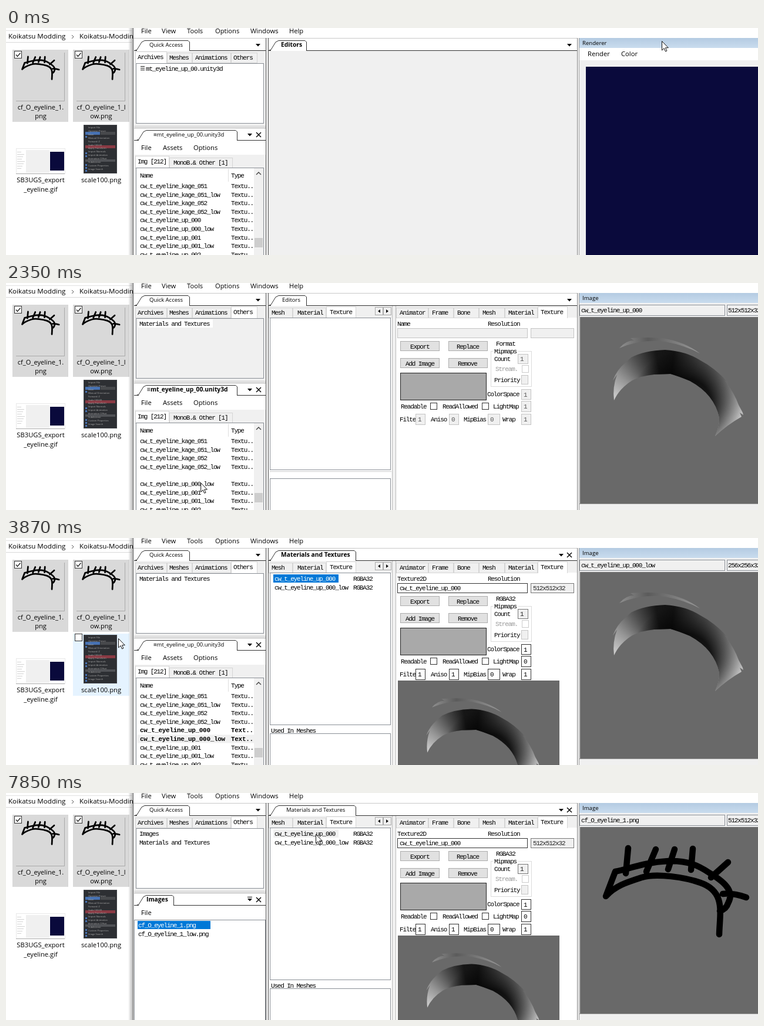
An HTML page with a canvas for the animation above (8000 ms loop, 1280 by 387 pixels).

```html
<!DOCTYPE html>
<html lang="en">
<head>
<meta charset="utf-8">
<title>Texture editor</title>
<style>
html, body { margin: 0; width: 100%; height: 100%; overflow: hidden; background: #fff; }
canvas { display: block; width: 1280px; height: 387px; }
</style>
</head>
<body>
<canvas id="stage" width="1280" height="387"></canvas>
<script>
const ctx = document.getElementById('stage').getContext('2d');
const LOOP = 8000, STEP = 70;
const FACE = '#f0f0f0', EDGE = '#8a8f96', BLUE = '#0078d7', GREY = '#696969';
const SANS = '"Open Sans", "Noto Sans", sans-serif';
const MONO = '"Liberation Mono", "DejaVu Sans Mono", monospace';

// bursts of change: start, end
const BURSTS = [[0, 840], [930, 1700], [1790, 2000], [2280, 3050], [3140, 3350], [3590, 4390],
  [4460, 4630], [4880, 5630], [5720, 6490], [6560, 7120], [7290, 7850]];
// pointer path: time, x, y
const PATH = [[0, 1116, 22], [280, 800, 190], [560, 390, 352], [700, 332, 358], [840, 325, 325],
  [1280, 325, 325], [1560, 331, 339], [2280, 331, 340], [2700, 332, 342], [3590, 333, 343],
  [3870, 191, 171], [4250, 156, 104], [4390, 153, 93], [4460, 153, 93], [4630, 155, 96],
  [4880, 155, 96], [5090, 166, 118], [5280, 235, 190], [5490, 330, 305], [5720, 330, 305],
  [6080, 346, 260], [6350, 340, 230], [6560, 340, 230], [6770, 322, 222], [7290, 322, 222],
  [7570, 425, 140], [7850, 527, 70]];

function snap(t) {
  const [a, b] = BURSTS.filter(s => s[0] <= t).pop();
  return Math.min(b, a + Math.floor((t - a) / STEP) * STEP);
}

function pointer(t) {
  const i = PATH.findIndex(p => p[0] > t);
  if (i < 0) return PATH[PATH.length - 1].slice(1);
  const [t0, x0, y0] = PATH[i - 1], [t1, x1, y1] = PATH[i];
  const k = (t - t0) / (t1 - t0);
  return [x0 + (x1 - x0) * k, y0 + (y1 - y0) * k];
}

function box(x0, y0, x1, y1, fill, edge) {
  if (fill) { ctx.fillStyle = fill; ctx.fillRect(x0, y0, x1 - x0, y1 - y0); }
  if (edge) {
    ctx.strokeStyle = edge; ctx.lineWidth = 1;
    ctx.strokeRect(x0 + .5, y0 + .5, x1 - x0 - 1, y1 - y0 - 1);
  }
}

function lines(points, color = '#222', width = 1, fill) {
  ctx.beginPath();
  points.forEach(([x, y], i) => i ? ctx.lineTo(x, y) : ctx.moveTo(x, y));
  if (fill) { ctx.fillStyle = fill; ctx.fill(); }
  if (color) { ctx.strokeStyle = color; ctx.lineWidth = width; ctx.stroke(); }
}
const hline = (x0, x1, y, c) => box(x0, y, x1, y + 1, c || '#333');
const vline = (x, y0, y1, c) => box(x, y0, x + 1, y1, c || '#555');

function text(s, x, y, font, color, align, gap) {
  ctx.font = font;
  ctx.letterSpacing = gap || '0px';
  ctx.textAlign = align || 'left';
  ctx.fillStyle = color || '#000';
  ctx.fillText(s, x, y + 4);
}
const ui = (s, x, y, size = 11.2, color, align) => text(s, x, y, size + 'px ' + SANS, color, align);
const tabText = (s, x, y, bold) =>
  text(s, x, y - .5, bold ? 'bold 10.3px ' + SANS : '9.5px ' + SANS);
const mono = (s, x, y, color, bold) =>
  text(s, x, y - .5, (bold ? 'bold ' : '') + '11px ' + MONO, color, 'left', bold ? '-0.3px' : '-1.17px');

function arrowDown(x, y, bar) {
  lines([[x - 4, y - 2], [x + 4, y - 2], [x, y + 2.5]], null, 1, '#000');
  if (bar) hline(x - 4, x + 4, y - 5, '#000');
}
function cross(x, y) {
  lines([[x - 4, y - 4], [x + 4, y + 4]], '#000', 1.5);
  lines([[x + 4, y - 4], [x - 4, y + 4]], '#000', 1.5);
}
function check(x, y, on) {
  box(x, y, x + 13, y + 13, '#fff', '#333');
  if (on) lines([[x + 3, y + 6.5], [x + 5.5, y + 9.5], [x + 10.5, y + 3.5]], '#222', 1.3);
}

// slanted dock tab with its strip
function dockTab(x0, x1, y, left, right, label, tx, bold) {
  box(left, y - 20, right, y + 1, '#fff');
  hline(left, right, y);
  box(x0 + 4, y, x1, y + 1, '#fff');
  lines([[x0, y + .5], [x0 + 4, y - 1], [x0 + 12, y - 14], [x0 + 17, y - 16.5], [x1 - 2, y - 16.5],
    [x1 + .5, y - 14], [x1 + .5, y + .5]], '#333');
  tabText(label, tx, y - 10, bold);
}

// row of inner tabs: label, text x, left edge, right edge
function innerTabs(tabs, active) {
  tabs.forEach(([s, tx, a, b]) => {
    const on = s === active;
    box(a, on ? 40 : 42, b, 60, on ? '#fff' : FACE, '#d5d5d5');
    if (on) box(a + 1, 58, b - 1, 61, '#fff');
    mono(s, tx, on ? 49 : 50);
  });
}

// hand drawn lash in a 318 unit square
function inkLash(x, y, scale) {
  ctx.save();
  ctx.translate(x, y);
  ctx.scale(scale, scale);
  ctx.lineCap = ctx.lineJoin = 'round';
  ctx.strokeStyle = '#000';
  ctx.lineWidth = 10.5;
  ctx.stroke(new Path2D('M44 118L60 76C85 71 110 60 150 58C185 57 202 66 220 78C252 97 262 112 252 130' +
    'Q249 140 238 143M44 118C60 100 80 94 105 86C130 78 180 86 205 95C248 110 238 145 237 183' +
    'M82 36L78 79M129 38L113 76M161 38L150 72M192 37L189 73M252 60L223 86M243 114Q260 112 283 120'));
  ctx.restore();
}

// shaded lash in the same square: tone runs round the arc, darker toward the inner rim
function shadedLash(x, y, scale) {
  ctx.save();
  ctx.translate(x, y);
  ctx.scale(scale, scale);
  const body = new Path2D('M58 142Q55 120 63 98L56 108Q63 90 76 79L87 69Q110 57 145 56Q180 58 205 74L217 81' +
    'Q239 96 252 112L246 108Q263 130 270 150L277 163L278 167L272 163L275 170Q250 184 230 203' +
    'Q238 185 237 172Q229 132 187 109Q168 101 154 97L126 98Q105 100 89 108Q67 122 58 142Z');
  const arc = ctx.createConicGradient(-Math.PI, 150, 170);
  [[.047, '#d4d4d4'], [.11, '#969696'], [.167, '#505050'], [.22, '#161616'], [.264, '#121212'], [.333, '#505050'],
    [.417, '#8c8c8c'], [.5, '#c0c0c0'], [.56, '#d4d4d4']].forEach(s => arc.addColorStop(...s));
  ctx.fillStyle = arc;
  ctx.fill(body);
  const rim = ctx.createRadialGradient(180, 150, 45, 180, 150, 95);
  rim.addColorStop(0, 'rgba(0,0,0,.85)');
  rim.addColorStop(1, 'rgba(0,0,0,0)');
  ctx.fillStyle = rim;
  ctx.fill(body);
  const h = ctx.createLinearGradient(68, 0, 204, 0);
  h.addColorStop(0, '#8f8f8f');
  h.addColorStop(.35, '#5b5b5b');
  h.addColorStop(1, '#9a9a9a');
  ctx.fillStyle = h;
  ctx.fill(new Path2D('M67 53Q78 40 92 40L86 36Q115 34 140 36Q178 42 204 62Q178 48 145 42Q105 37 67 53Z'));
  ctx.restore();
}

function fileItem(x0, x1, y1, picked, hover) {
  const y0 = y1 - (picked ? 123 : 106);
  if (picked && hover) box(x0, y0, x1, y1, '#cce8ff', '#99d1ff');
  else if (picked) box(x0, y0, x1, y1, '#d9d9d9');
  else if (hover) box(x0, y0, x1, y1, '#e5f3ff');
}

function explorer(cx, cy) {
  box(0, 0, 217, 387, '#fff');
  hline(0, 214, 4, '#e2e2e2');
  hline(0, 214, 24, '#d9d9d9');
  ui('Koikatsu Modding', 4, 14, 11.6);
  lines([[112, 12], [115, 15], [112, 18]], '#555');
  ui('Koikatsu-Modding', 125, 14, 11.6);
  const inside = (y0, y1) => cx >= 114 && cx < 210 && cy >= y0 && cy < y1;
  const overLow = inside(37, 160), overScale = inside(162, 269);
  fileItem(11, 106, 160, true, false);
  fileItem(114, 210, 160, true, overLow);
  fileItem(114, 210, 269, false, overScale);
  [17, 120].forEach((x, i) => {
    vline(x + 82, 42, 125, i && overLow ? '#a2c4dc' : '#aaa');
    hline(x, x + 83, 124, i && overLow ? '#a2c4dc' : '#aaa');
    inkLash(x - 1, 39.5, .262);
    check(x - 3, 39, true);
  });
  ui('cf_O_eyeline_1.', 59, 135, 11.1, '#000', 'center');
  ui('png', 59, 150, 11.1, '#000', 'center');
  ui('cf_O_eyeline_1_l', 162, 135, 11.1, '#000', 'center');
  ui('ow.png', 162, 150, 11.1, '#000', 'center');

  // window thumbnail
  box(17, 205, 101, 249, '#fff', '#e8e8e8');
  box(34, 208, 74, 247, '#f0f0f0');
  box(75, 211, 99, 243, '#0a0a3c');
  for (let i = 0; i < 8; i++) hline(19, 26 + i * 5 % 7, 211 + i * 4, '#d4d4d4');
  hline(17, 100, 248, '#aaa');
  ui('SB3UGS_export', 59, 259, 11.2, '#000', 'center');
  ui('_eyeline.gif', 59, 275, 11.2, '#000', 'center');

  // settings thumbnail
  box(132, 165, 189, 248, '#2d2f33', '#44474b');
  box(135, 177, 160, 182, '#4772b3');
  box(161, 177, 186, 182, '#47494c');
  box(135, 200, 186, 205, '#8a3a44');
  box(135, 224, 186, 228, '#505256');
  ['Import File', 'Operator Preset', 'Main', 'Manual Orientation', 'Forward: Z', 'Scale 100.00', 'Apply Transform',
    'Import Normals', 'Import Animation', 'Animation Offset', 'Subdivision', 'Custom Properties', 'Image Search']
    .forEach((s, i) => text(s, 140, 167 + i * 5.9, '4px ' + SANS, '#a8a8a8'));
  [184, 212, 217, 232, 237, 242].forEach(y => box(135, y, 138, y + 3, '#4772b3'));
  ui('scale100.png', 162, 259, 11.2, '#000', 'center');
  if (overScale) check(117, 163, false);
}

function quickAccess(s) {
  dockTab(219, 312, 38, 218, 442, 'Quick Access', 244, false);
  arrowDown(429, 29);
  box(218, 39, 442, 168, FACE);
  innerTabs([['Archives', 224, 220, 274], ['Meshes', 278, 274, 317], ['Animations', 322, 317, 383],
    ['Others', 387, 383, 428]], s.others ? 'Others' : 'Archives');
  box(221, 60, 439, 163, s.others && !s.ready ? FACE : '#fff', EDGE);
  if (!s.others) {
    for (let i = 0; i < 3; i++) hline(229, 236, 65 + i * 3, '#111');
    mono('mt_eyeline_up_00.unity3d', 238, 69);
  } else {
    if (s.images) mono('Images', 227, 69);
    if (!s.ready) box(225, 62, 352, 76, '#fff');
    mono('Materials and Textures', 227, s.images ? 84 : 69);
  }
  hline(218, 442, 167, '#c8c8c8');
}

function archivePane(s) {
  dockTab(222, 393, 191, 218, 442, '≡mt_eyeline_up_00.unity3d', s.fileBold ? 240 : 251, s.fileBold);
  arrowDown(415, 182);
  cross(430, 182);
  box(218, 192, 442, 216, '#fff');
  ui('File', 230, 204);
  ui('Assets', 267, 204);
  ui('Options', 319, 204);
  box(218, 216, 442, 387, FACE);
  box(278, 221, 386, 239, FACE, '#d5d5d5');
  box(220, 218, 278, 240, '#fff', '#d5d5d5');
  mono('Img [212]', 224, 227);
  mono('MonoB.& Other [1]', 285, 229);
  box(221, 238, 439, 390, '#fff', EDGE);
  mono('Name', 228, 251.5);
  mono('Type', 383, 251.5);
  vline(378, 240, 262, '#ddd');
  ['kage_051', 'kage_051_low', 'kage_052', 'kage_052_low', 'up_000', 'up_000_low', 'up_001', 'up_001_low', 'up_002']
    .forEach((n, i) => {
      const y = 269.5 + i * 14.6, main = i === 4, low = i === 5;
      if (main && s.blank) return;
      const picked = main && s.pickMain || low && s.pickLow;
      const bold = main && s.ready || low && s.lowAdded;
      if (picked) box(223, y - 7, 378, y + 7, BLUE);
      else if (low && s.lowAdded) box(223, y - 7, 422, y + 7, FACE);
      mono('cw_t_eyeline_' + n, 228, y, picked ? '#fff' : '#000', bold);
      mono(bold ? 'Text..' : 'Textu..', 383, y, '#000', bold);
    });
  box(422, 239, 438, 387, FACE);
  lines([[426, 250], [430, 246], [434, 250]], '#444', 1.4);
  box(423, 358, 437, 374, '#cdcdcd');
}

function imagesPane(s) {
  dockTab(222, 285, 191, 218, 442, 'Images', 239, true);
  arrowDown(415, 182, true);
  cross(430, 182);
  box(218, 192, 442, 216, '#fff');
  ui('File', 230, 204);
  box(218, 216, 442, 390, '#fff', EDGE);
  if (s.inkPicked) box(224, 218, 348, 232, BLUE);
  mono('cf_O_eyeline_1.png', 225, 225, s.inkPicked ? '#fff' : '#000');
  mono('cf_O_eyeline_1_low.png', 225, 240);
}

function field(x0, y0, x1, y1, value, on) {
  box(x0, y0, x1, y1, on ? '#fff' : FACE, on ? '#333' : '#c4c4c4');
  mono(value, x0 + 4, (y0 + y1) / 2, on ? '#000' : '#555');
}
// filled in, but not editable
function readout(x0, y0, x1, y1, value) {
  box(x0, y0, x1, y1, FACE, '#777');
  mono(value, x0 + 4, (y0 + y1) / 2, '#222');
}
function button(x, y, label, tx) {
  box(x, y, x + 67, y + 17, '#e1e1e1', '#adadad');
  mono(label, tx, y + 9);
}

function textureForm(s) {
  const on = s.ready;
  mono(on ? 'Texture2D' : 'Name', 666, 69);
  mono('Resolution', 820, 69);
  field(666, 77, 888, 94, on ? 'cw_t_eyeline_up_000' : '', on);
  if (on) readout(893, 77, 967, 94, '512x512x32');
  else field(893, 77, 967, 94, '', false);
  button(671, 99, 'Export', 688);
  button(753, 99, 'Replace', 767);
  button(671, 128, 'Add Image', 680);
  button(753, 128, 'Remove', 769);
  mono(on ? 'RGBA32' : 'Format', 834, 103);
  box(825, 116, 895, 177, null, '#dcdcdc');
  box(829, 112, 872, 120, '#fff');
  mono('Mipmaps', 831, 116);
  mono('Count', 831, 129);
  if (on) readout(871, 121, 889, 138, '1');
  else field(871, 121, 889, 138, '1', false);
  mono('Stream.', 833, 146, '#999');
  box(878, 140, 890, 153, '#fff', '#ccc');
  mono('Priority', 831, 165);
  field(877, 157, 889, 173, '', false);
  box(671, 153, 818, 200, '#a9a9a9', '#222');
  mono('ColorSpace', 819, 189);
  field(877, 181, 894, 199, '1', on);
  mono('Readable', 672, 210);
  box(722, 204, 734, 216, '#fff', '#333');
  mono('ReadAllowed', 743, 210);
  box(810, 204, 822, 216, '#fff', '#333');
  mono('LightMap', 829, 210);
  field(877, 201, 894, 220, on ? '0' : '1', on);
  [['Filte', 670, 697, 714, '1'], ['Aniso', 723, 754, 771, on ? '1' : '0'], ['MipBias', 779, 820, 841, '0'],
    ['Wrap', 845, 877, 894, '1']].forEach(([n, x, a, b, v]) => {
    mono(n, x, 232);
    field(a, 223, b, 242, v, on);
  });
  if (on) {
    box(667, 243, 942, 387, GREY);
    shadedLash(667, 243, .865);
  }
}

function editorPane(s) {
  const name = s.ready ? 'Materials and Textures' : 'Editors';
  dockTab(447, s.ready ? 595 : 511, 38, 447, 973, name, s.editorBold ? 468 : s.ready ? 477 : 470, s.editorBold);
  arrowDown(s.ready ? 945 : 959, 29);
  if (s.ready) cross(959, 29);
  box(447, 39, 973, 387, FACE);
  if (s.frame && !s.others) box(449, 59, 727, 390, '#fff', EDGE);
  if (!s.others) return;
  innerTabs([['Mesh', 452, 447, 488], ['Material', 496, 488, 545], ['Texture', 551, 545, 596]], 'Texture');
  [628, 642].forEach((x, i) => {
    box(x, 41, x + 14, 55, FACE, '#aaa');
    const d = i ? 2 : -2;
    lines([[x + 7 - d, 45], [x + 7 - d, 51], [x + 7 + d, 48]], null, 1, '#111');
  });
  box(447, 60, 657, 387, '#fff');
  box(449, 59, 655, 319, '#fff', EDGE);
  if (s.ready) {
    const active = !s.images;
    box(455, 62, 566, 76, active ? BLUE : FACE);
    mono('cw_t_eyeline_up_000', 457, 69, active ? '#fff' : '#000');
    mono('RGBA32', 591, 69);
    if (s.lowAdded) {
      mono('cw_t_eyeline_up_000_low', 457, 84);
      mono('RGBA32', 591, 84);
    }
    mono('Used In Meshes', 451, 328);
  } else hline(449, 656, 321, '#ccc');
  box(449, 333, 655, 395, '#fff', EDGE);
  vline(657, 39, 387, '#bbb');
  if (!s.form) return;
  box(664, 59, 972, 387, '#fff');
  vline(663, 39, 387, '#bbb');
  innerTabs([['Animator', 670, 664, 719], ['Frame', 725, 719, 762], ['Bone', 768, 762, 805], ['Mesh', 811, 805, 849],
    ['Material', 855, 849, 905], ['Texture', 910, 905, 956]], 'Texture');
  textureForm(s);
}

function viewer(s) {
  box(974, 0, 1280, 387, FACE);
  box(974, 0, 1280, 17, '#fff');
  const g = ctx.createLinearGradient(0, 17, 0, 34);
  g.addColorStop(0, '#b4cbe2');
  g.addColorStop(1, '#c9dcee');
  box(976, 17, 1280, 34, g);
  vline(975, 17, 387, '#a0a0a0');
  ui(s.image ? 'Image' : 'Renderer', 981, 25, 9.6);
  if (!s.image) {
    box(976, 34, 1280, 55, '#fff');
    ui('Render', 990, 44);
    ui('Color', 1047, 44);
    box(987, 66, 1280, 387, '#0a0a3c');
    return;
  }
  box(976, 37, 1224, 56, FACE, EDGE);
  box(1227, 37, 1290, 56, FACE, EDGE);
  mono(s.ink ? 'cf_O_eyeline_1.png' : 'cw_t_eyeline_up_000' + (s.lowImage ? '_low' : ''), 979, 46);
  mono(s.lowImage && !s.ink ? '256x256x32' : '512x512x32', 1229, 46);
  box(977, 58, 1280, 377, GREY);
  if (s.ink) inkLash(977, 58, 1);
  else shadedLash(977, 58, 1);
  hline(976, 1280, 376, '#999');
}

function arrow(x, y) {
  lines([[0, 0], [0, 15.5], [3.6, 12], [6, 17.5], [8.4, 16.5], [6, 11.2], [10.8, 11.2], [0, 0]]
    .map(p => [x + .5 + p[0], y + .5 + p[1]]), '#111', 1, '#fff');
}

function draw(now) {
  const t = snap(now % LOOP);
  const s = {
    fileBold: t >= 1000 && t < 2770,
    pickMain: t >= 1000 && t < 1420,
    image: t >= 1140,
    blank: t >= 1420 && t < 2770,
    frame: t >= 1490,
    others: t >= 1630,
    form: t >= 1790,
    ready: t >= 2770,
    pickLow: t >= 2910 && t < 3210,
    lowImage: t >= 2980,
    lowAdded: t >= 3210,
    images: t >= 5580,
    editorBold: t < 1000 || t >= 2770 && t < 2910 || t >= 3210 && t < 5580,
    inkPicked: t >= 6770,
    ink: t >= 6840
  };
  const [cx, cy] = pointer(t);
  explorer(cx, cy);
  const g = ctx.createLinearGradient(208, 0, 217, 0);
  g.addColorStop(0, 'rgba(0,0,0,0)');
  g.addColorStop(1, 'rgba(0,0,0,.32)');
  box(208, 0, 217, 387, g);
  box(217, 0, 1280, 387, FACE);
  box(217, 0, 1280, 17, '#fff');
  [['File', 230], ['View', 265], ['Tools', 308], ['Options', 356], ['Windows', 416], ['Help', 482]]
    .forEach(([n, x]) => ui(n, x, 5));
  quickAccess(s);
  s.images ? imagesPane(s) : archivePane(s);
  editorPane(s);
  viewer(s);
  hline(217, 973, 17, '#c8c8c8');
  hline(218, 442, 170, '#aaa');
  vline(216, 0, 387, '#666');
  vline(442, 17, 387);
  vline(446, 17, 387);
  vline(972, 17, 387, '#888');
  arrow(cx, cy);
}

let start;
function tick(now) {
  if (start === undefined) start = now;
  draw(Math.max(0, now - start));
  requestAnimationFrame(tick);
}
draw(0);
requestAnimationFrame(tick);
</script>
</body>
</html>
```
